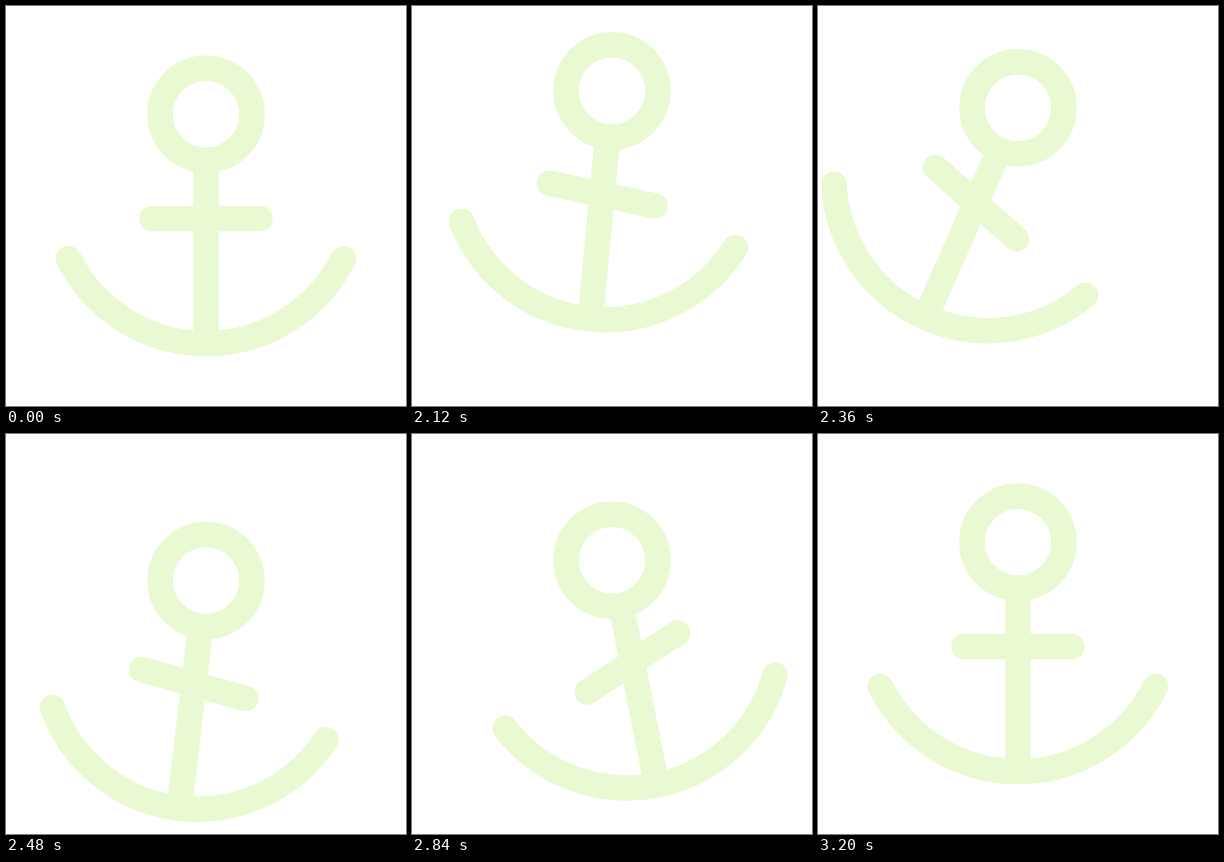
Recreate the animation shown at these times as an HTML page. Size 400x400 px, loop 3260 ms.

```html
<!DOCTYPE html>
<html>
<head>
<meta charset="utf-8">
<title>Swinging anchor</title>
<style>
  html, body { margin: 0; height: 100%; overflow: hidden; background: #fff; }
  svg { display: block; width: 100vw; height: 100vh; }
</style>
</head>
<body>
<svg viewBox="0 0 400 400" fill="none" stroke="#e9f9d1" stroke-width="25.5">
  <g id="anchor">
    <circle r="46"/>
    <g id="body">
      <path d="M0 46V229"/>
      <path d="M-137.5 144.2A153.7 153.7 0 0 0 137.5 144.2" stroke-linecap="round"/>
      <path id="bar" d="M-54 0H54" stroke-linecap="round"/>
    </g>
  </g>
</svg>
<script>
const LOOP = 3260, REST = 2030, STEP = 30;
const [anchor, body, bar] = ['anchor', 'body', 'bar'].map(id => document.getElementById(id));

// Eased 0 to 1 between two times; snap makes the start faster and the braking longer.
function ease(t, start, end, snap = 0) {
  const u = Math.min(1, Math.max(0, (t - start) / (end - start)));
  let s = u;
  for (let i = 0; i < 6; i++) { // Newton: s - snap * (1 - s) * s² = u
    s -= (s - snap * (1 - s) * s * s - u) / (1 - snap * s * (2 - 3 * s));
  }
  return s * s * (3 - 2 * s);
}

// The ring hops up, drops below its place and climbs back.
const height = t =>
  108.3 - 45.2 * ease(t, 2015, 2220) + 93.7 * ease(t, 2220, 2567, .35) - 48.5 * ease(t, 2567, 3200, 1.1);

// The body swings around the ring in shrinking turns.
const swing = t =>
  23.8 * ease(t, 2012, 2361) - 41.7 * ease(t, 2361, 2732, 1.1)
  + 21 * ease(t, 2732, 3020) - 3.1 * ease(t, 3020, 3200);

// The crossbar follows with its own, slower tilt.
const tilt = t =>
  17.5 * ease(t, 2012, 2361, 1.1) - 39.5 * ease(t, 2361, 2872, 1.1) + 22 * ease(t, 2872, 3200, .8);

function draw(now) {
  const time = now % LOOP;
  const t = REST + Math.floor((time - REST) / STEP) * STEP;
  anchor.setAttribute('transform', `translate(200 ${height(t)})`);
  body.setAttribute('transform', `rotate(${swing(t)})`);
  bar.setAttribute('transform', `translate(0 104.2) rotate(${tilt(t)})`);
}

let origin;
function tick(now) {
  origin ??= now;
  draw(now - origin);
  requestAnimationFrame(tick);
}
draw(0);
requestAnimationFrame(tick);
</script>
</body>
</html>
```
